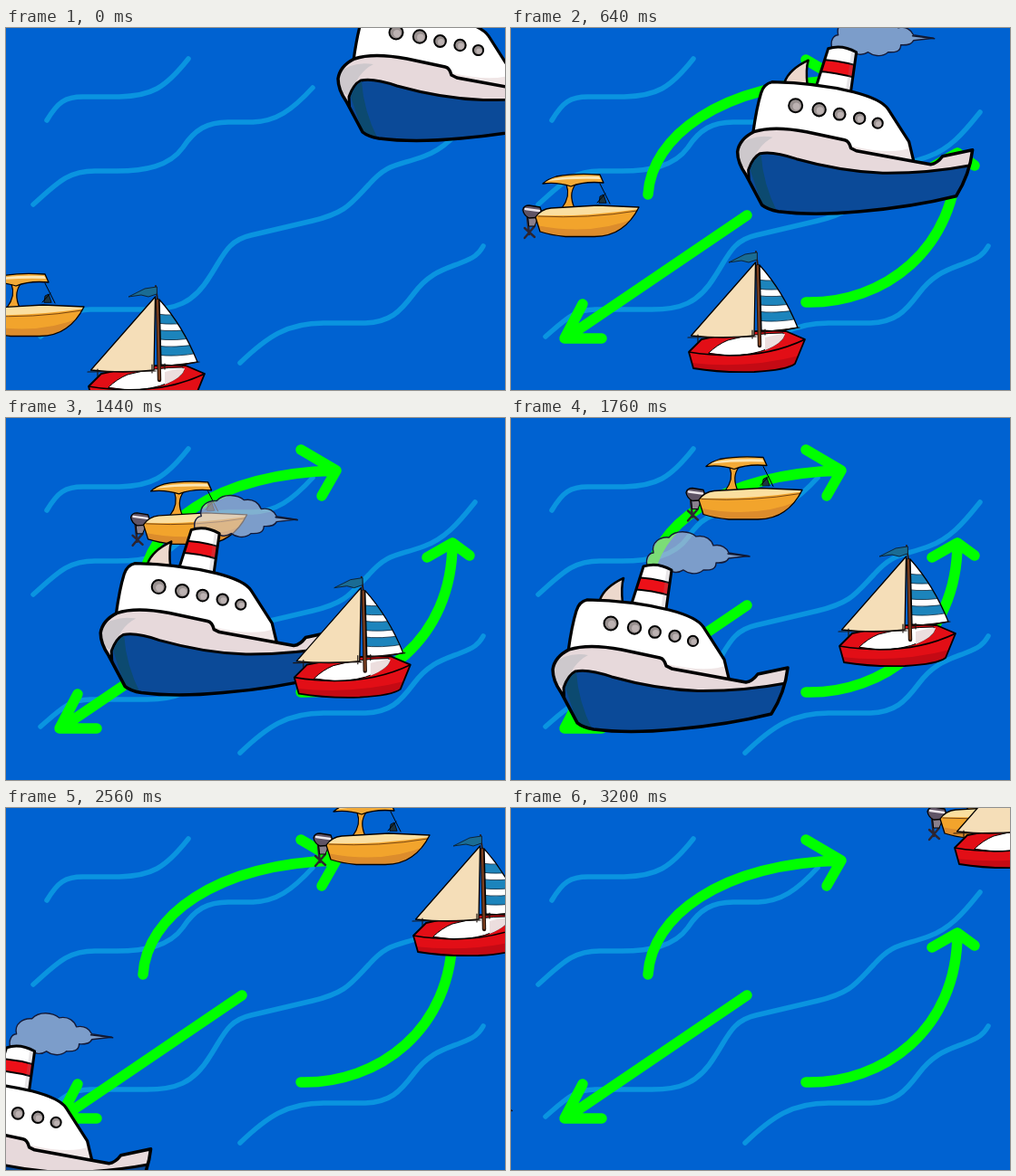
Recreate the animation shown at these times as an HTML page with a canvas. Size 550 px wide and 400 px high, loop 3.24 s.

```html
<!DOCTYPE html>
<html lang="en">
<head>
<meta charset="utf-8">
<title>Boats</title>
<style>
html, body { margin: 0; width: 100%; height: 100%; overflow: hidden; background: #0062d1; }
canvas { display: block; width: 550px; height: 400px; }
</style>
</head>
<body>
<canvas id="stage" width="550" height="400"></canvas>
<script>
const ctx = document.getElementById('stage').getContext('2d');
const LOOP = 3240, STEP = 40, ARROWS_AT = 320;
const INK = '#000', SEA = '#0062d1', FOAM = '#0a94e0';

ctx.lineCap = ctx.lineJoin = 'round';

function shape(d, fill, line, width = 1.3) {
  const path = new Path2D(d);
  if (fill) {
    ctx.fillStyle = fill;
    ctx.fill(path);
  }
  if (line) {
    ctx.strokeStyle = line;
    ctx.lineWidth = width;
    ctx.stroke(path);
  }
}

function disc(x, y, r, fill, line, width) {
  shape(`M${x - r} ${y}a${r} ${r} 0 1 0 ${2 * r} 0a${r} ${r} 0 1 0 ${-2 * r} 0Z`, fill, line, width);
}

function clipped(d, draw) {
  ctx.save();
  ctx.clip(new Path2D(d));
  draw();
  ctx.restore();
}

function at(x, y, draw) {
  ctx.save();
  ctx.translate(x, y);
  draw();
  ctx.restore();
}

// Smooth curve through [time, x, y] keys.
function along(keys, t) {
  let i = 0;
  while (i < keys.length - 2 && t > keys[i + 1][0]) i++;
  const a = keys[i], b = keys[i + 1];
  const h = b[0] - a[0], u = (t - a[0]) / h;
  const slope = (k, c) => {
    const p = keys[Math.max(k - 1, 0)], q = keys[Math.min(k + 1, keys.length - 1)];
    return (q[c] - p[c]) / (q[0] - p[0]);
  };
  return [1, 2].map(c =>
    a[c] * (1 + 2 * u) * (1 - u) ** 2 + b[c] * u * u * (3 - 2 * u) +
    h * u * (1 - u) * (slope(i, c) * (1 - u) - slope(i + 1, c) * u));
}

const motorKeys = [
  [0, -55, 110], [640, 0, 0], [1080, 64.5, -56], [1760, 180, -118.5],
  [2240, 266, -150.5], [2560, 326, -168], [3200, 446, -197]
];
const sailKeys = [
  [0, -105, 38], [640, 0, 0], [1080, 69, -36], [1760, 166, -106],
  [2240, 222, -169], [2560, 253, -217], [3200, 293, -314]
];

const waves = [
  'M45 102C57 82 65 76 85 76H125C160 75 175 67 201 34',
  'M30 195C57 171 68 158 98 158H122C153 158 180 153 195 132C208 112 222 104 245 104H272C298 103 315 91 338 66',
  'M38 341C60 322 70 311 93 311H150C187 312 207 304 225 274C240 251 244 235 270 229L338 213C375 204 380 194 400 173C421 149 430 153 460 142C483 134 498 117 517 93',
  'M258 370C288 341 310 326 350 326H396C423 325 434 314 449 294C466 271 482 267 500 260C516 254 521 250 526 241'
];

const arrows = [
  'M151 184C155 120 230 62 363 58M325 35L364 58L348 86',
  'M260 207L60 343M79 305L59 343H100',
  'M325 303C410 305 492 245 492 138M464 154L492 138L511 152'
];

function motorboat() {
  // outboard engine
  shape('M18 209L20 228M15 221L26 231M26 219L15 232', null, '#2c2430', 2.4);
  shape('M19 209H30L26 219H20Z', '#8a808c', INK, 1);
  shape('M13 201Q14 196 20 196L32 198L36 209L20 210Q14 207 13 201Z', '#5f5466', INK);
  shape('M16 200L31 202', null, '#ece6ec', 2.5);
  // helm and windscreen post
  shape('M97 193L98 186L102 184L105 193Z', '#1c3440', INK, .8);
  shape('M98 172L109 194M104 183L95 193', null, INK, 1);
  // canopy
  shape('M61 173H71C65 181 66 190 70 199H56C63 190 64 181 61 173Z', '#f2a430', INK, 1.2);
  shape('M35 172Q40 167 50 164Q70 160 98 162L102 171Q81 169 66 175Q51 170 35 172Z', '#f2aa38', INK);
  shape('M40 169Q52 163 97 164L99 167Q68 166 40 169Z', '#fbe6b4');
  // hull
  const hull = 'M27 209Q33 200 44 199L96 196L141 198Q133 214 121 222Q110 230 92 230.5H60Q44 229 32 225Z';
  shape(hull, '#f2a42c');
  clipped(hull, () => {
    shape('M28 218Q90 230 137 210V235H28Z', '#dc8c2c');
    shape('M27 207Q80 209 141 200V195H27Z', '#fbdfa0');
  });
  shape('M30 208Q85 211 139 202', null, '#7a4814', 1);
  shape(hull, null, INK);
}

function ship() {
  // smoke
  shape('M149 163C147 155 151 149 156 149C153 137 164 131 173 132C181 123 196 125 203 131C214 129 220 135 222 141C231 139 237 144 239 149L261 152.5L239 155C236 161 229 160 225 160C225 169 216 168 211 168C203 175 193 171 189 168C180 174 173 168 169 166Z',
    'rgba(207,197,198,.6)', '#141a38', 1.4);
  shape('M238 150L262 153', null, '#101830', 1.6);
  // bow fin and funnel
  shape('M97 201Q102 187 123 177Q120 187 122 205Z', '#ecd8cc', INK, 2.5);
  const funnel = 'M145 164Q160 159 176 168L169 218L131 208Z';
  shape(funnel, '#fff');
  clipped(funnel, () => {
    shape('M130 176Q155 176 180 184V198Q155 190 130 189Z', '#ec1018', INK, 2);
    shape('M171 164L180 166L172 220H163Z', 'rgba(140,130,140,.2)');
  });
  shape(funnel, null, INK, 3);
  // cabin
  const cabin = 'M62 258Q66 229 71 213Q74 203 83 201Q132 202 173 212Q204 220 211 231L234 267L240 292L170 282Z';
  shape(cabin, '#fff');
  clipped(cabin, () => shape('M172 272Q215 282 238 273L242 295H170Z', '#f0e6e6'));
  shape(cabin, null, INK, 3.2);
  [[109, 227, 7.5], [135, 231.5, 7.2], [157.5, 236.5, 6.4], [179.5, 241, 6.2], [199.5, 246.5, 5.6]].forEach(([x, y, r]) => {
    disc(x, y, r, '#98908f', INK, 2);
    disc(x + 1, y + 1, r * .55, '#bcb2b2');
  });
  // hull
  const hull = 'M45 278Q47 264 63 256Q84 249 121 256L163 265Q168 266 170 274L176 277L236 288L258 292Q265 291 271 283L304 276Q301 303 286 327Q238 339 180 344Q128 349 90 344Q78 342 72 337L54 303Q45 290 45 278Z';
  shape(hull, '#e7d9db');
  clipped(hull, () => {
    shape('M44 273Q60 258 84 262Q66 271 58 298L44 290Z', '#cdc8cc');
    shape('M57 298Q62 284 70 280Q84 277 110 286Q160 300 205 301.5Q255 302 302 293L298 357H60Z', '#0b4a98', INK, 3);
    shape('M59 298Q63 285 71 281Q73 313 89 345L73 340Z', '#0c4a70');
  });
  shape(hull, null, INK, 3.5);
}

function sailboat() {
  // hull
  const hull = 'M196 358L210 344Q258 333 303 335L324 344L313 371Q304 378 268 380Q230 381 201 376Z';
  shape(hull, '#e20e16');
  clipped(hull, () => {
    shape('M198 370Q260 377 318 362V385H198Z', '#c40a14');
    shape('M218 359Q227 350 239 345Q268 337 300 337Q305 344 284 354Q266 362 240 362Z', '#fff', INK, 1);
    shape('M280 342Q296 338 302 338Q300 348 280 356Z', '#ecdede');
    shape('M196 358Q270 370 324 344', null, INK, 1.6);
  });
  shape(hull, null, INK, 1.8);
  // mast and flag
  shape('M270 247L273 270', null, '#30180c', 1.8);
  shape('M272 263L274 351', null, '#24120a', 4.4);
  shape('M272 263L274 350', null, '#7c4020', 2.2);
  shape('M271 248L258 250L250 254L240 259L254 257L262 259L271 256Z', '#1a6c94', '#0c2438', 1);
  // sails
  shape('M269.5 259L198.5 340Q235 344 268 340Z', '#f5deb8', INK, 1.3);
  const jib = 'M274 262Q300 291 316 331Q296 336 276 334Z';
  shape(jib, '#fff');
  clipped(jib, () => {
    [278, 295.5, 313].forEach(y =>
      shape(`M270 ${y}Q292 ${y + 3} 318 ${y - 2}V${y + 8}Q292 ${y + 13} 270 ${y + 10}Z`, '#1c84bc', '#10283c', .8));
  });
  shape(jib, null, INK, 1.3);
  shape('M195 342L270 341M276 336L318 331M206 339V347M266 334V343M280 333V339', null, '#1c1410', 1.2);
}

function draw(now) {
  const t = Math.floor((now % LOOP) / STEP) * STEP;
  ctx.fillStyle = SEA;
  ctx.fillRect(0, 0, 550, 400);
  waves.forEach(d => shape(d, null, FOAM, 5.5));
  if (t >= ARROWS_AT) arrows.forEach(d => shape(d, null, '#0f0', 11.5));
  at(...along(motorKeys, t), motorboat);
  at(321 - .1818 * t, -222 + .1261 * t, ship);
  at(...along(sailKeys, t), sailboat);
}

const start = performance.now();
function tick() {
  draw(performance.now() - start);
  requestAnimationFrame(tick);
}
tick();
</script>
</body>
</html>
```
